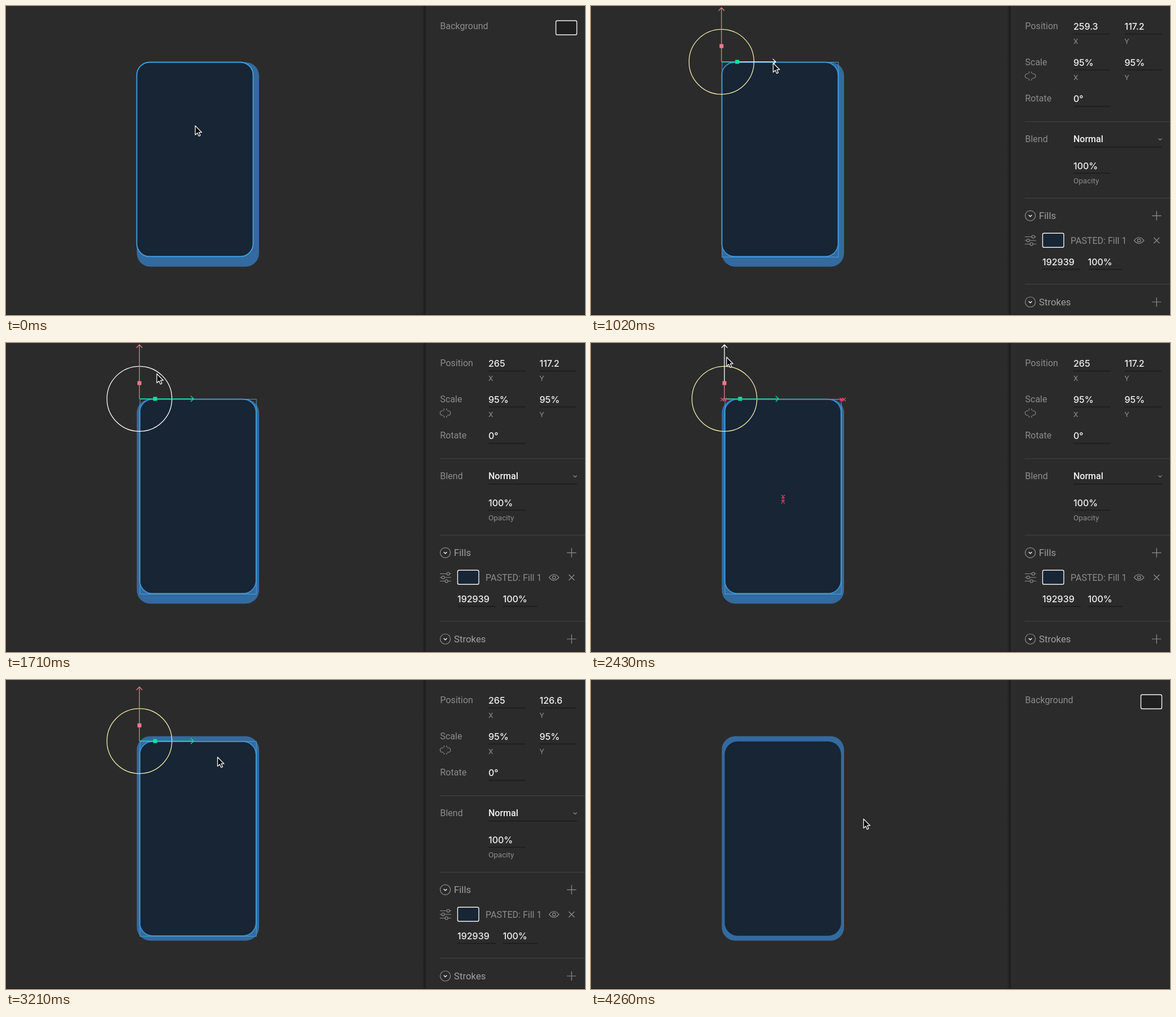
An HTML page that plays this animation: 1025 px wide and 547 px high, repeating every 4620 ms.

```html
<!DOCTYPE html>
<html lang="en">
<head>
<meta charset="utf-8">
<title>Centering a shape</title>
<style>
  html, body { margin: 0; width: 100%; height: 100%; overflow: hidden; background: #2b2b2b; }
  svg { display: block; width: 100vw; height: 100vh; }
  text { font: 16px Roboto, sans-serif; fill: #8c8c8c; white-space: pre; }
  .num { font: 500 16px Inter, sans-serif; fill: #f2f2f2; }
  .value { font-weight: 500; fill: #f2f2f2; }
  .small { font-size: 13.5px; }
  .head { font-size: 16.8px; fill: #a0a0a0; }
  .icon { fill: none; stroke: #8e8e8e; stroke-width: 1.2; }
  .field { stroke: #1f1f1f; stroke-width: 2; }
  .rule { stroke: #3c3c3c; stroke-width: 1.4; }
  .line { fill: none; stroke-width: 1.3; }
  .guide { fill: none; stroke: #ee4266; stroke-width: 1.2; }
</style>
</head>
<body>
<svg viewBox="0 0 1025 547" preserveAspectRatio="none">
  <defs>
    <linearGradient id="shade">
      <stop offset="0" stop-color="#1c1c1c" stop-opacity="0"/>
      <stop offset="1" stop-color="#1c1c1c"/>
    </linearGradient>
  </defs>
  <rect width="1025" height="547" fill="#2b2b2b"/>

  <rect x="231.5" y="99.5" width="216.5" height="362" rx="24" fill="#336a9f"/>
  <g id="card">
    <rect id="face" x="231.5" y="99.5" width="206" height="344" rx="23" fill="#172534"/>
    <rect id="box" x="232" y="99.5" width="206" height="345" fill="none" stroke="#4d9fd6"/>
    <g id="gizmo">
      <circle id="ring" class="line" cx="231" cy="98.8" r="57.5"/>
      <path class="line" stroke="#ea7a8c" d="M231 98.8V71"/>
      <path id="armY" class="line" d="M231 71V3M225.8 8.5L231 3L236.2 8.5"/>
      <path class="line" stroke="#0fe3a0" d="M231 98.8H259"/>
      <path id="armX" class="line" d="M259 98.8H327M321.8 93.6L327 98.8L321.8 104"/>
      <rect x="227.5" y="67.5" width="7" height="7" fill="#ea7a8c"/>
      <rect x="255.3" y="95.3" width="7" height="7" fill="#0fe3a0"/>
    </g>
  </g>
  <path id="guides" class="guide"/>

  <rect x="736" width="7" height="547" fill="url(#shade)"/>
  <rect x="743" width="282" height="547" fill="#2b2b2b"/>

  <g id="blank">
    <text x="768.5" y="41">Background</text>
    <rect x="973.5" y="26" width="37" height="25" rx="2.5" fill="#1f1f1f" stroke="#f2f2f2" stroke-width="1.4"/>
  </g>

  <g id="props">
    <path class="field" d="M854 49.8H920M945 49.8H1010M854 113.2H920M945 113.2H1010M854 177.8H920M854 249.8H1011M854 296H920M799 466.2H867M880 466.2H941"/>
    <path class="rule" d="M768 204.7H1025M768 340.3H1025M768 492.5H1025"/>
    <text x="768.5" y="41">Position</text>
    <text id="posX" class="num" x="854" y="42.4"></text>
    <text id="posY" class="num" x="944.5" y="42.4"></text>
    <text class="small" x="854" y="67">X</text>
    <text class="small" x="944.5" y="67">Y</text>
    <text x="768.5" y="104.7">Scale</text>
    <text class="num" x="854" y="106">95%</text>
    <text class="num" x="944.5" y="106">95%</text>
    <text class="small" x="854" y="130.5">X</text>
    <text class="small" x="944.5" y="130.5">Y</text>
    <text x="768.5" y="169.3">Rotate</text>
    <text class="num" x="854" y="170.4">0°</text>
    <text x="768.5" y="241.4">Blend</text>
    <text class="value" x="854" y="241.4">Normal</text>
    <text class="num" x="854" y="288.6">100%</text>
    <text class="small" x="854" y="313.5">Opacity</text>
    <text class="head" x="793" y="377">Fills</text>
    <text x="849" y="420.5">PASTED: Fill 1</text>
    <text class="num" x="799" y="459">192939</text>
    <text class="num" x="879.5" y="459">100%</text>
    <text class="head" x="793" y="530">Strokes</text>
    <rect x="799.5" y="402.3" width="37.5" height="25" rx="2.5" fill="#172534" stroke="#f2f2f2" stroke-width="1.4"/>
    <g class="icon">
      <path d="M774.5 120H772.5a4 4 0 0 0 0 8H774.5M781 120H783a4 4 0 0 1 0 8H781M775.5 119V116M780 119V116M775.5 129V132M780 129V132"/>
      <path d="M1004.5 234.5L1007.5 237.5L1010.5 234.5"/>
      <path d="M768 408.5H780M785.6 408.5H788M768 415H771M776.6 415H788M768 421.5H777M782.6 421.5H788"/>
      <circle cx="782.8" cy="408.5" r="2.5"/>
      <circle cx="773.8" cy="415" r="2.5"/>
      <circle cx="779.8" cy="421.5" r="2.5"/>
      <path d="M961.5 415Q970 404.5 978.8 415Q970 425.5 961.5 415Z"/>
      <circle cx="970.2" cy="415" r="2.7"/>
      <path d="M996.3 410L1006.3 420M1006.3 410L996.3 420"/>
      <path d="M993 371.3H1009.5M1001.3 363V379.5M993 524H1009.5M1001.3 515.8V532.3"/>
      <circle cx="777.7" cy="371.3" r="9"/>
      <circle cx="777.7" cy="524" r="9"/>
      <path stroke="#f2f2f2" stroke-width="1.5" d="M774.9 370L777.7 372.8L780.5 370M774.9 522.7L777.7 525.5L780.5 522.7"/>
    </g>
  </g>

  <rect y="546" width="1025" height="1" fill="#1d1d1d"/>
  <path id="cursor" d="M0 0V16.2L3.8 12.7L6.3 18.3L9 17.1L6.6 11.7H11.5Z" fill="#0b0b0b" stroke="#f5f5f5" stroke-width="1.3" stroke-linejoin="round"/>
</svg>
<script>
const LOOP = 4620, STEP = 30;
const ids = ["card", "face", "box", "gizmo", "ring", "armX", "armY", "guides", "blank", "props", "posX", "posY", "cursor"];
const ui = Object.fromEntries(ids.map(id => [id, document.getElementById(id)]));

// time, x, y of the pointer tip
const pointer = [
  [0, 335, 212], [30, 335, 212], [480, 317.5, 109.5], [570, 317, 108.5],
  [1020, 322.5, 101], [1080, 328, 101], [1200, 328, 101],
  [1620, 276, 67], [1710, 267, 54.5], [2160, 240, 25], [2460, 240, 25],
  [2700, 240, 34.4], [2910, 240, 34.4], [3210, 374.5, 136.5],
  [3450, 447, 208], [3720, 482.5, 246]
];

const between = (t, a, b) => t >= a && t < b;
const ramp = (t, a, b) => Math.min(1, Math.max(0, (t - a) / (b - a)));
const ease = k => k * k * (3 - 2 * k);
const show = (el, on) => el.setAttribute("display", on ? "inline" : "none");
const shift = (el, x, y) => el.setAttribute("transform", `translate(${x} ${y})`);
const paint = (el, color) => el.setAttribute("stroke", color);
const cross = (x, y) => `M${x - 3} ${y - 3}l6 6m0-6l-6 6`;

function pointerAt(t) {
  const i = pointer.findIndex(p => p[0] > t);
  if (i < 0) return pointer[pointer.length - 1].slice(1);
  const [t0, x0, y0] = pointer[i - 1], [t1, x1, y1] = pointer[i];
  const k = ease(ramp(t, t0, t1));
  return [x0 + (x1 - x0) * k, y0 + (y1 - y0) * k];
}

function guidePath(t, dy) {
  let d = "";
  const draggingY = between(t, 2370, 2910);
  if (between(t, 1080, 1200) || draggingY) {
    const y = 272 + dy;
    d += cross(340, y) + cross(340, 281) + `M340 ${y}V281`;
  }
  if (draggingY && dy === 0) {
    d += [232.5, 237, 443.5, 448].map(x => cross(x, 100)).join("") + "M232 100H448";
  }
  return d;
}

function draw(t) {
  const selected = between(t, 90, 3870);
  const kx = ramp(t, 1020, 1080), ky = ease(ramp(t, 2460, 2700));
  const dx = 5.2 * kx, dy = 9.3 * ky;

  shift(ui.card, dx, dy);
  paint(ui.face, t < 90 ? "#3fa4e4" : selected ? "#3395d8" : "none");
  ui.face.setAttribute("stroke-width", 1.8);
  show(ui.box, selected);
  show(ui.gizmo, selected);
  show(ui.props, selected);
  show(ui.blank, !selected);

  paint(ui.ring, between(t, 1650, 1800) ? "#ffffff" : "#f3ecb0");
  paint(ui.armX, between(t, 870, 1290) ? "#ffffff" : "#0fe3a0");
  paint(ui.armY, between(t, 2010, 2970) ? "#ffffff" : "#ea7a8c");
  ui.guides.setAttribute("d", guidePath(t, dy));

  ui.posX.textContent = +(259.3 + 5.7 * kx).toFixed(1);
  ui.posY.textContent = +(117.2 + 9.4 * ky).toFixed(1);
  shift(ui.cursor, ...pointerAt(t));
}

const start = performance.now();
function tick() {
  const t = (performance.now() - start) % LOOP;
  draw(Math.floor(t / STEP) * STEP);
  requestAnimationFrame(tick);
}
tick();
</script>
</body>
</html>
```
